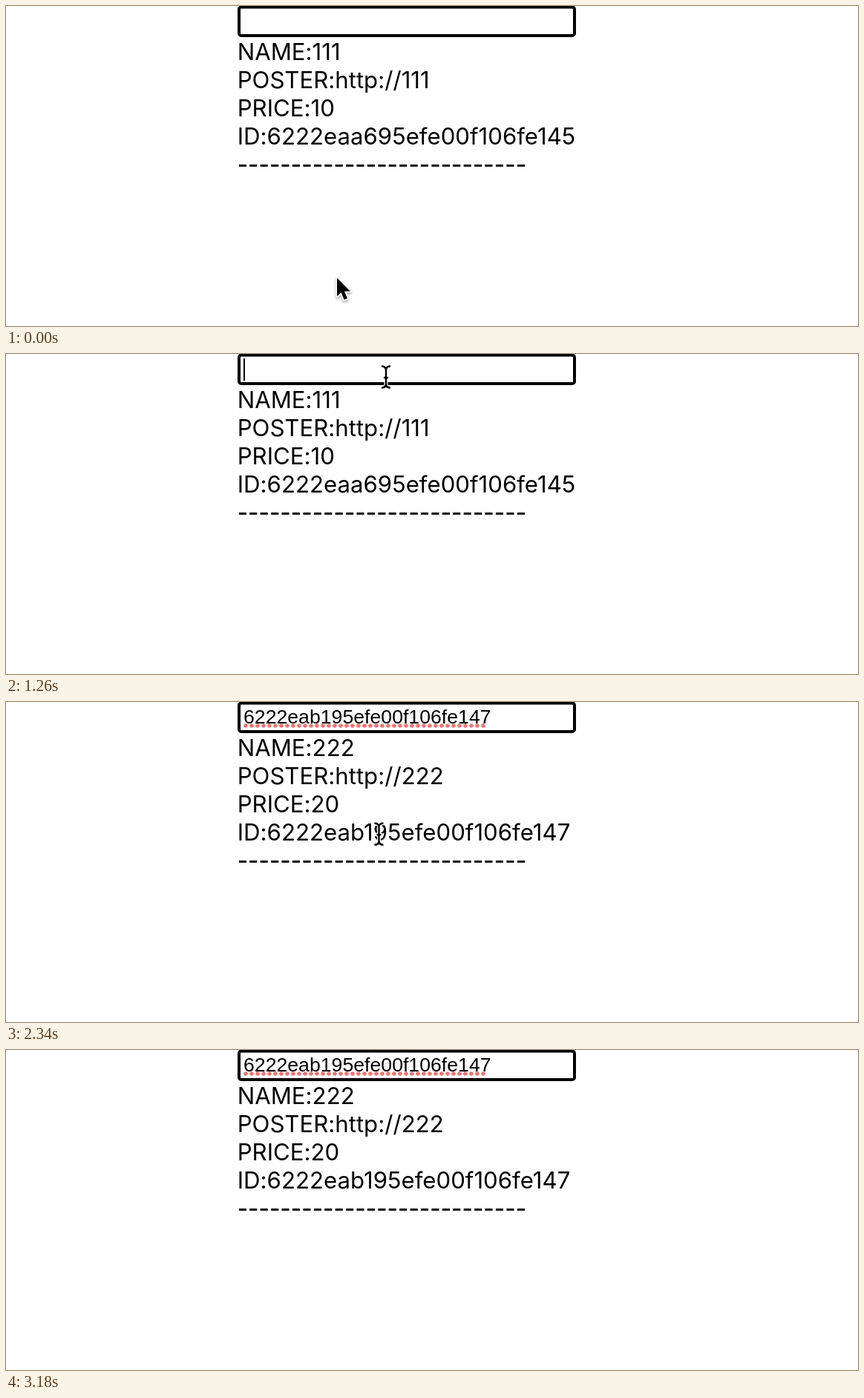
An HTML page that plays this animation: 1148x432 px, repeating every 3.48 s.

```html
<!DOCTYPE html>
<html lang="en">
<head>
<meta charset="utf-8">
<title>Lookup by ID</title>
<style>
  html, body { margin: 0; width: 100%; height: 100%; overflow: hidden; background: #fff; }
  svg { display: block; }
  .row { font: 31.2px Inter, Roboto, sans-serif; font-feature-settings: "calt" 0; }
  .row:last-child { font-weight: 500; }
  .value { font: 26.667px "Liberation Sans", Arial, sans-serif; }
  #arrow { filter: drop-shadow(0 2px 1.5px rgba(0, 0, 0, .35)); }
  .halo { fill: none; stroke: #fff; stroke-linejoin: round; stroke-linecap: round; }
</style>
</head>
<body>
<svg width="1148" height="432" viewBox="0 0 1148 432">
  <defs>
    <path id="head" d="M0 1V26L5.6 20.8L9.6 30.6L14 28.8L10 19.2H18Z"/>
    <path id="beam" d="M-6 -14.5Q-0.5 -14.5 0 -10Q0.5 -14.5 6 -14.5M0 -10V10M-6 14.5Q-0.5 14.5 0 10Q0.5 14.5 6 14.5M-3 1H3"/>
  </defs>
  <rect x="314" y="1.5" width="452" height="38.5" rx="3" fill="#fff" stroke="#000" stroke-width="4"/>
  <g id="entry">
    <line x1="323" y1="32" x2="643.5" y2="32" stroke="#f07472" stroke-width="5.6"
      stroke-linecap="round" stroke-dasharray="0 8"/>
    <text id="value" class="value" x="320" y="29"></text>
  </g>
  <rect id="caret" y="6" width="2" height="30"/>
  <g id="rows"></g>
  <g id="arrow">
    <use href="#head" class="halo" stroke-width="3.6"/>
    <use href="#head"/>
  </g>
  <g id="ibeam">
    <use href="#beam" class="halo" stroke-width="5"/>
    <use href="#beam" fill="none" stroke="#000" stroke-width="2.4"/>
  </g>
</svg>
<script>
const LOOP = 3480, TICK = 60;
const PASTE = 1860, RESULT = 1920;
const LEFT = 311.7, TOP = 43, PITCH = 38;
const ITEMS = [
  { name: "111", price: 10, id: "6222eaa695efe00f106fe145" },
  { name: "222", price: 20, id: "6222eab195efe00f106fe147" }
];

const easeOut = u => 1 - (1 - u) ** 1.8;
const easeIn = u => u * u;
const easeInOut = u => u < .5 ? 4 * u ** 3 : 1 - 4 * (1 - u) ** 3;

// Up to the field, back down, then off the bottom edge.
const MOVES = [
  { start: 600, end: 1140, from: [446, 366], bend: [558, 154], to: [512, 31], ease: easeOut },
  { start: 1980, end: 2700, from: [512, 31], bend: [502, 178], to: [494, 326], ease: easeInOut },
  { start: 2700, end: 3000, from: [494, 326], bend: [489, 383], to: [480, 440], ease: easeIn }
];

const $ = id => document.getElementById(id);
const show = (el, on) => el.setAttribute("visibility", on ? "visible" : "hidden");

const rows = Array.from({ length: 5 }, (_, i) => {
  const el = document.createElementNS("http://www.w3.org/2000/svg", "text");
  el.setAttribute("class", "row");
  el.setAttribute("x", LEFT);
  el.setAttribute("y", TOP + 30 + PITCH * i);
  return $("rows").appendChild(el);
});
$("value").textContent = ITEMS[1].id;

const linesOf = item => [
  "NAME:" + item.name,
  "POSTER:http://" + item.name,
  "PRICE:" + item.price,
  "ID:" + item.id,
  "-".repeat(27)
];

function pointerAt(t) {
  const m = MOVES.filter(m => t >= m.start).pop() || MOVES[0];
  const u = Math.min(1, Math.max(0, (t - m.start) / (m.end - m.start)));
  const s = m.ease(u), r = 1 - s;
  return m.from.map((a, i) => r * r * a + 2 * r * s * m.bend[i] + s * s * m.to[i]);
}

// The pointer becomes a text beam over the field and over each line's text.
function overText(x, y) {
  if (y < TOP) return true;
  const row = rows[Math.floor((y - TOP) / PITCH)];
  return !!row && x < LEFT + row.getComputedTextLength();
}

// Blinking restarts when text is pasted.
function caretOn(t) {
  const since = t - (t >= PASTE ? PASTE : 360);
  return since >= 0 && since % 900 < 420;
}

function draw(t) {
  const pasted = t >= PASTE;
  linesOf(ITEMS[t >= RESULT ? 1 : 0]).forEach((s, i) => {
    if (rows[i].textContent !== s) rows[i].textContent = s;
  });
  show($("entry"), pasted);
  $("caret").setAttribute("x", pasted ? 653.5 : 320);
  show($("caret"), caretOn(t));

  const [x, y] = pointerAt(t);
  const beam = overText(x, y);
  for (const id of ["arrow", "ibeam"]) {
    $(id).setAttribute("transform", `translate(${x} ${y})`);
    show($(id), beam === (id === "ibeam"));
  }
}

const start = performance.now();
function frame() {
  const t = (performance.now() - start) % LOOP;
  draw(Math.floor(t / TICK) * TICK);
  requestAnimationFrame(frame);
}
frame();
</script>
</body>
</html>
```
